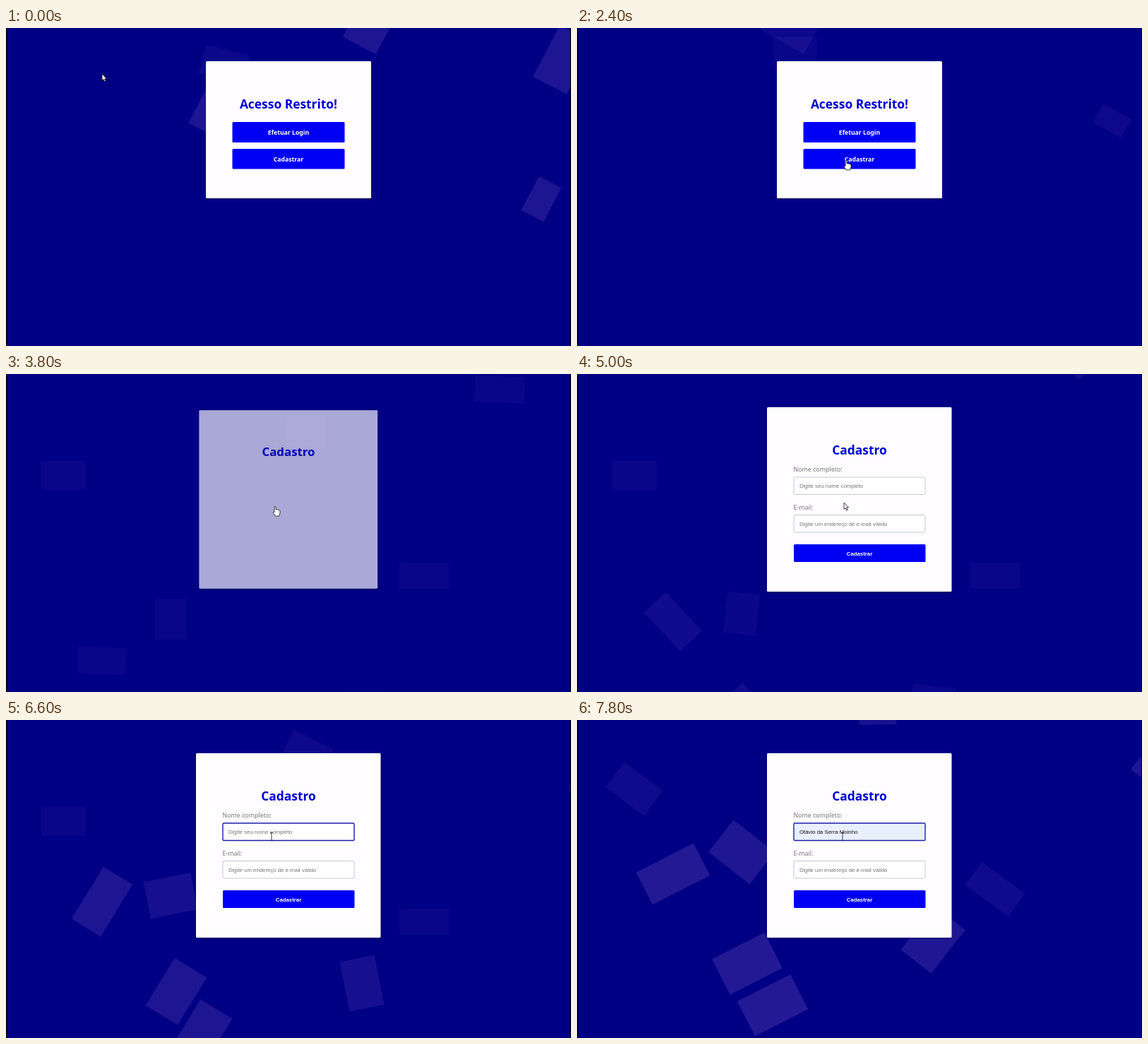
Animation of 800x450 px, one loop 8 s. Source, as an HTML page:

```html
<!DOCTYPE html>
<html lang="pt-BR">
<head>
<meta charset="utf-8">
<title>Cadastro</title>
<style>
  html, body { margin: 0; width: 100%; height: 100%; overflow: hidden; background: #000085; }
  svg { display: block; width: 100vw; height: 100vh; }
  text { font-family: "Noto Sans", "Open Sans", sans-serif; }
  .title { font-weight: 700; font-size: 17.4px; fill: #0000d2; text-anchor: middle; }
  .button { fill: #0000f4; }
  .caption { font-weight: 700; font-size: 8.7px; fill: #fff; text-anchor: middle; }
  .label { font-size: 8.85px; fill: #777; }
  .input { fill: #fff; stroke: #c6c9d4; stroke-width: 1; }
  .input.focus { stroke: #1c1caa; stroke-width: 1.4; }
  .input.filled { fill: #e8f0fe; }
  .arial { font-family: "Liberation Sans", Arial, sans-serif; font-size: 7.8px; }
  .hint { fill: #757575; }
  .hint.filled { fill: #111; }
  .card { fill: #fffdff; filter: drop-shadow(0 1px 1px rgba(0, 0, 0, .4)); }
  .cursor { fill: #fff; stroke: #111; stroke-width: .8; stroke-linejoin: round; }
</style>
</head>
<body>
<svg viewBox="0 0 800 450" preserveAspectRatio="none">
  <rect width="800" height="450" fill="#000085"/>
  <g id="squares" fill="#f0aaf0"></g>

  <g id="access">
    <rect class="card" x="283" y="47" width="234" height="194" rx="1.5"/>
    <text class="title" x="400" y="114">Acesso Restrito!</text>
    <rect class="button" x="320.5" y="133" width="159" height="29" rx="1.5"/>
    <text class="caption" x="400" y="151">Efetuar Login</text>
    <rect class="button" x="320.5" y="171" width="159" height="28.5" rx="1.5"/>
    <text class="caption" x="400" y="188.5">Cadastrar</text>
  </g>

  <g id="signup">
    <rect class="card" x="269" y="47" width="261.5" height="261" rx="1.5"/>
    <text class="title" x="400" y="114">Cadastro</text>
    <g id="fields">
      <text class="label" x="306.5" y="138.3">Nome completo:</text>
      <rect class="input" id="nameBox" x="307" y="146" width="186" height="24.5" rx="1.5"/>
      <text class="arial hint" id="nameText" x="315" y="160.8"></text>
      <text class="label" x="306.5" y="192.3">E-mail:</text>
      <rect class="input" x="307" y="199.5" width="186" height="24.5" rx="1.5"/>
      <text class="arial hint" x="315" y="214.8">Digite um endereço de e-mail válido</text>
      <rect class="button" x="307" y="241" width="186.5" height="25" rx="1.5"/>
      <text class="caption arial" x="400" y="256.8">Cadastrar</text>
    </g>
  </g>

  <g id="cursor" class="cursor">
    <path id="arrow" d="M0 0V9.4L2.1 7.4L3.7 11L5.3 10.3L3.7 6.9H6.5Z"/>
    <path id="hand" d="M-1 1Q0 -.8 1.1 1V5Q2.2 4 3 5.2Q4.2 4.4 5 5.7Q6.6 5 7 6.8V9.5L5.6 14H.2L-2.8 9.4Q-3 7.7 -1 8.6Z"/>
    <path id="beam" fill="none" d="M-2 -5.5H2M0 -5.5V5.5M-2 5.5H2"/>
  </g>
  <rect width="1.5" height="450"/>
  <rect x="799" width="1" height="450"/>
</svg>
<script>
  const LOOP = 8000, STEP = 200, SWITCH = 3600;
  const DRIFT = 7600, TRAVEL = 225;
  const $ = id => document.getElementById(id);

  // Squares set off in waves from where they rest: [x, y, width].
  // On the first page they sink back to rest, on the second they rise from it.
  const squares = [
    ...wave(-4950, true, [[309, 33, 62]]),
    ...wave(-1690, true, [[758, 95, 43], [789, -102, 65], [519, -158, 64], [302, -37, 66]]),
    ...wave(SWITCH, false, [[136, 409, 68], [699, 25, 70], [241, 536, 62], [277, 595, 63]]),
    ...wave(SWITCH + 1000, false, [[233, 347, 45], [504, 471, 61], [830, 220, 56]]),
    ...wave(SWITCH + 2000, false, [[425, 82, 59]]),
    ...wave(SWITCH + 3000, false, [[81, 143, 63], [592, 285, 70]])
  ];

  function wave(start, back, spots) {
    return spots.map(([x, y, w]) => {
      // Sinking squares share one shape, rising ones share one area.
      const h = back ? w * .66 : 2600 / w;
      const el = document.createElementNS("http://www.w3.org/2000/svg", "path");
      el.setAttribute("d", `M${-w / 2} ${-h / 2}h${w}v${h}h${-w}z`);
      $("squares").append(el);
      return { el, x, y, start, back };
    });
  }

  const clamp = v => Math.min(1, Math.max(0, v));
  const mix = (a, b, k) => a + (b - a) * k;
  const bezier = (a, b, u) => 3 * a * u * (1 - u) ** 2 + 3 * b * u * u * (1 - u) + u ** 3;

  // CSS "ease"
  function ease(x) {
    let low = 0, high = 1;
    for (let i = 0; i < 24; i++) {
      const mid = (low + high) / 2;
      if (bezier(.25, .25, mid) < x) low = mid; else high = mid;
    }
    return bezier(.1, 1, low);
  }

  function show(el, on) {
    el.style.display = on ? "" : "none";
  }

  function drawSquare({ el, x, y, start, back }, t) {
    const eased = ease(clamp((t - start) / DRIFT));
    const away = back ? 1 - eased : eased;
    const height = y + (back ? TRAVEL : -TRAVEL) * away;
    el.setAttribute("transform", `translate(${x} ${height}) rotate(${180 * away}) scale(${1 + .4 * away})`);
    el.setAttribute("opacity", .035 + .13 * away);
    show(el, back === t < SWITCH);
  }

  // One curved move to the lower button, then a short one up to the first field.
  function drawCursor(t) {
    const reach = clamp(t / 2200), lift = clamp((t - 5200) / 600);
    const bend = (a, b, c) => mix(mix(a, b, reach), mix(b, c, reach), reach);
    const slip = t < 4000 ? 0 : 1;
    const x = bend(136, 212, 381) - 3 * slip - 2 * lift;
    const y = bend(65, 198, 187) - 5 * slip - 17 * lift;
    $("cursor").setAttribute("transform", `translate(${x} ${y})`);
    const shape = lift > .6 ? "beam" : reach === 1 && !slip ? "hand" : "arrow";
    for (const id of ["arrow", "hand", "beam"]) show($(id), id === shape);
  }

  function drawForm(t) {
    const entry = clamp((t - SWITCH) / 300);
    show($("access"), t < SWITCH);
    show($("signup"), t >= SWITCH);
    show($("fields"), t >= 4000);
    $("signup").setAttribute("opacity", entry);
    $("signup").setAttribute("transform",
      `translate(400 177.5) scale(${mix(.9, 1, entry)}) translate(-400 -177.5)`);

    const filled = t >= 7400;
    $("nameBox").classList.toggle("focus", t >= 6000);
    $("nameBox").classList.toggle("filled", filled);
    $("nameText").classList.toggle("filled", filled);
    $("nameText").textContent = filled ? "Otávio da Serra Moinho" : "Digite seu nome completo";
  }

  const begin = performance.now();
  function frame() {
    const t = Math.floor((performance.now() - begin) % LOOP / STEP) * STEP;
    squares.forEach(square => drawSquare(square, t));
    drawForm(t);
    drawCursor(t);
    requestAnimationFrame(frame);
  }
  frame();
</script>
</body>
</html>
```
